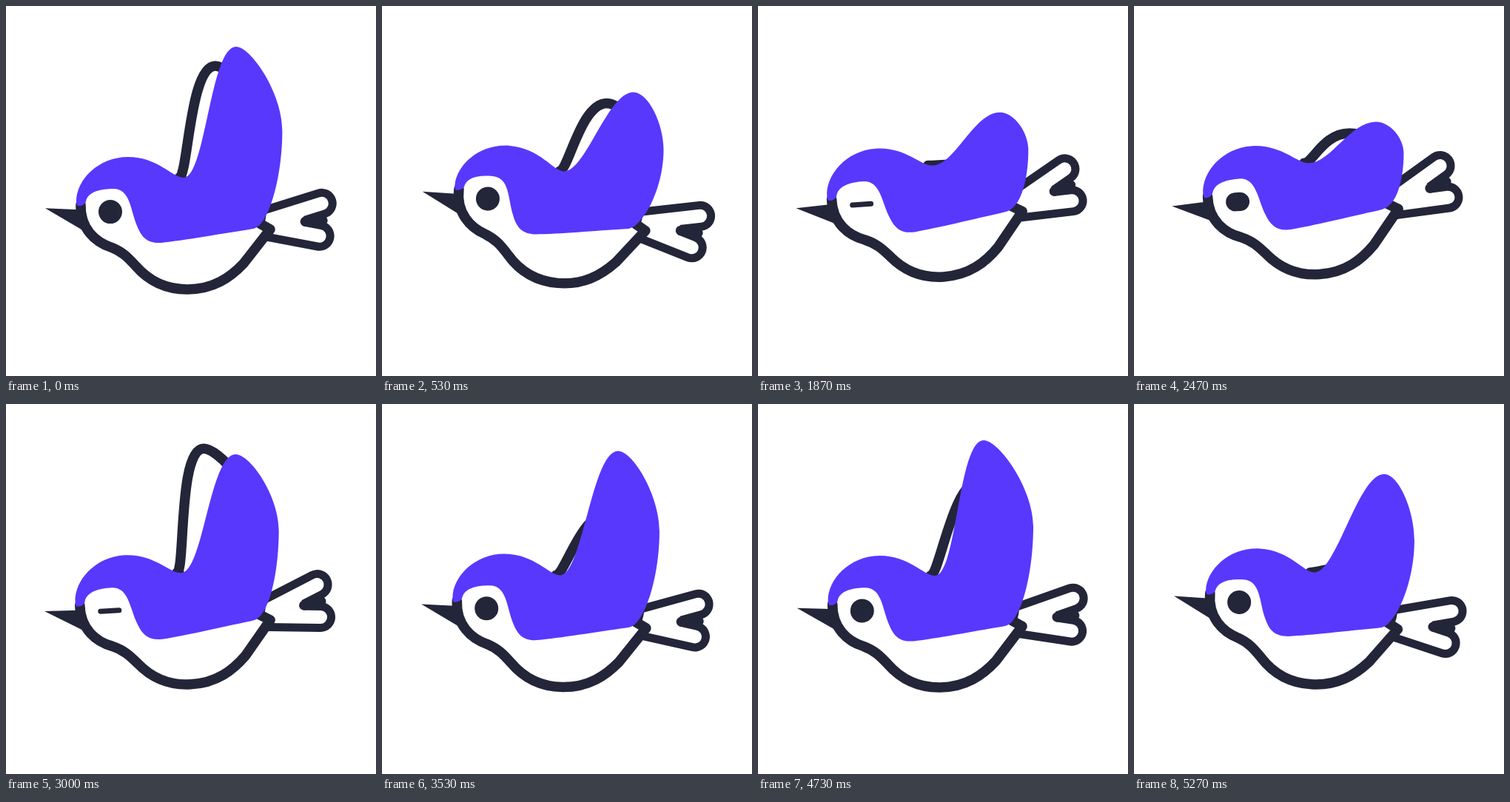
Write an HTML page that moves like this. It is 500x500 px and loops after 5.31 s.

```html
<!DOCTYPE html>
<html lang="en">
<head>
<meta charset="utf-8">
<title>Flying bird</title>
<style>
  html, body { margin: 0; width: 100%; height: 100%; overflow: hidden; background: #fff; }
  svg { display: block; width: 100vw; height: 100vh; }
  .ink { fill: #232539; }
  .line { fill: #fff; stroke: #232539; stroke-width: 13.5; stroke-linejoin: round; stroke-linecap: round; }
  .blue { fill: #5838fd; }
  .arm { fill: none; stroke-linecap: round; stroke-linejoin: round; }
</style>
</head>
<body>
<svg viewBox="0 0 500 500">
  <g id="tail">
    <path class="arm" stroke="#232539" stroke-width="40" d="M426 265L338 295L424 309"/>
    <path fill="#fff" d="M338 295L402 273V306Z"/>
    <path class="arm" stroke="#fff" stroke-width="18" d="M426 265L338 295L424 309"/>
    <path class="arm" stroke="#232539" stroke-width="13" d="M404 290L428 288"/>
  </g>
  <path id="backWing" class="line"/>
  <g id="body">
    <path id="beak" class="ink" d="M53 273L98 275L108 290L104 303Z"/>
    <path class="line" d="M101 268C100 301 121 319 142 326C157 332 164 339 175 351C194 373 218 383 245 383C280 383 303 367 321 348L357 302L336 290"/>
    <path class="blue" d="M95 264C95 235 125 204 165 204C205 204 225 232 240 232C275 240 330 262 350 283Q345 300 330 302C290 308 240 317 210 320C193 321 184 315 177 297C168 275 168 247 145 247C130 247 111 250 108 264Q106 270 98 270Q95 270 95 264Z"/>
    <rect id="eye" class="ink" x="125" width="32"/>
  </g>
  <path id="frontWing" class="blue"/>
</svg>
<script>
const LOOP = 5310, BEAT = 590;
const part = id => document.getElementById(id);
const tail = part('tail'), body = part('body'), beak = part('beak'), eye = part('eye');
const backWing = part('backWing'), frontWing = part('frontWing');

// Wing strokes: time in the beat, then wing tip and outer edge
const strokes = [
  { at: 20, tip: [303, 47], edge: [371, 165] },
  { at: 105, tip: [327, 167], edge: [365, 214] },
  { at: 300, tip: [275, 500], edge: [345, 390] },
  { at: 480, tip: [342, 207], edge: [383, 249] },
  { at: 550, tip: [338, 100], edge: [379, 189] }
];
// The back wing drifts in and out of step: time, delay
const drift = [[0, 10], [1870, -30], [3530, 55], [4170, 10], [5270, 70]];

const clamp = v => Math.min(1, Math.max(0, v));
const wrap = t => (t % BEAT + BEAT) % BEAT;

function delayAt(t) {
  const i = Math.max(1, drift.findIndex(d => d[0] > t));
  const [a, u] = drift[i - 1], [b, v] = drift[i];
  return u + (v - u) * (t - a) / (b - a);
}

// Cyclic monotone cubic through the strokes
function wingAt(t) {
  const n = strokes.length;
  const key = i => strokes[(i + n) % n];
  const time = i => key(i).at + BEAT * Math.floor(i / n);
  let i = n - 1;
  while (i >= 0 && strokes[i].at > t) i--;
  const h = time(i + 1) - time(i), s = (t - time(i)) / h;
  const blend = val => {
    const rise = j => (val(j + 1) - val(j)) / (time(j + 1) - time(j));
    const slope = j => {
      const a = rise(j - 1), b = rise(j);
      return a * b > 0 ? 2 * a * b / (a + b) : 0;
    };
    return val(i) + (val(i + 1) - val(i)) * s * s * (3 - 2 * s)
      + h * s * (1 - s) * ((1 - s) * slope(i) - s * slope(i + 1));
  };
  const point = name => [0, 1].map(k => blend(j => key(j)[name][k]));
  return [...point('tip'), ...point('edge')];
}

// Point carried by the body's turn, before its lift
function turned(x, y, deg) {
  const a = deg * Math.PI / 180, dx = x - 245, dy = y - 295;
  return [245 + dx * Math.cos(a) + dy * Math.sin(a), 295 - dx * Math.sin(a) + dy * Math.cos(a)];
}

function wingPath(t, turn, far) {
  let [tx, ty, ex, ey] = wingAt(wrap(t));
  let [ax, ay] = turned(240, 232, turn);
  const [bx, by] = turned(334, 301, turn);
  let root = 30;
  if (far) {
    tx -= 36; ty += 17; ex -= 34; ax -= 6; root = 12;
  }
  return `M${ax} ${ay}C${ax + root} ${ay} ${tx - 35} ${ty} ${tx} ${ty}`
    + `C${tx + 20} ${ty} ${ex} ${ey - (ey - ty) * 0.45} ${ex} ${ey}`
    + `C${ex} ${ey + (by - ey) * 0.48} ${bx + 21} ${by - 4} ${bx} ${by}Z`;
}

function draw(now) {
  const t = now % LOOP, p = t % BEAT;
  const angle = ms => 2 * Math.PI * ms / BEAT;
  const turn = 7.2 * Math.sin(angle(p)) + 4.7 * (Math.cos(angle(p)) - 1);
  const lift = -36 * (1 - Math.cos(angle(p - 6)));
  const wag = 19 * Math.sin(angle(p - 8));
  const nod = 13 * (1 - Math.cos(angle(p - 15)));
  const shift = `translate(0 ${lift})`;
  const pose = `${shift} rotate(${-turn} 245 295)`;

  body.setAttribute('transform', pose);
  tail.setAttribute('transform', `${pose} rotate(${turn - wag} 345 295)`);
  beak.setAttribute('transform', `rotate(${-nod} 100 285)`);

  // The eye shuts gently and springs open again
  const height = 7 + 25 * Math.max(clamp((44 - p) / 25), clamp((p - 103) / 11));
  eye.setAttribute('y', 278 - height / 2);
  eye.setAttribute('height', height);
  eye.setAttribute('rx', height / 2);

  frontWing.setAttribute('transform', shift);
  frontWing.setAttribute('d', wingPath(t, turn, false));
  backWing.setAttribute('transform', shift);
  backWing.setAttribute('d', wingPath(t - delayAt(Math.min(t, 5269)), turn, true));
}

const start = performance.now();
function tick() {
  draw(performance.now() - start);
  requestAnimationFrame(tick);
}
tick();
</script>
</body>
</html>
```
